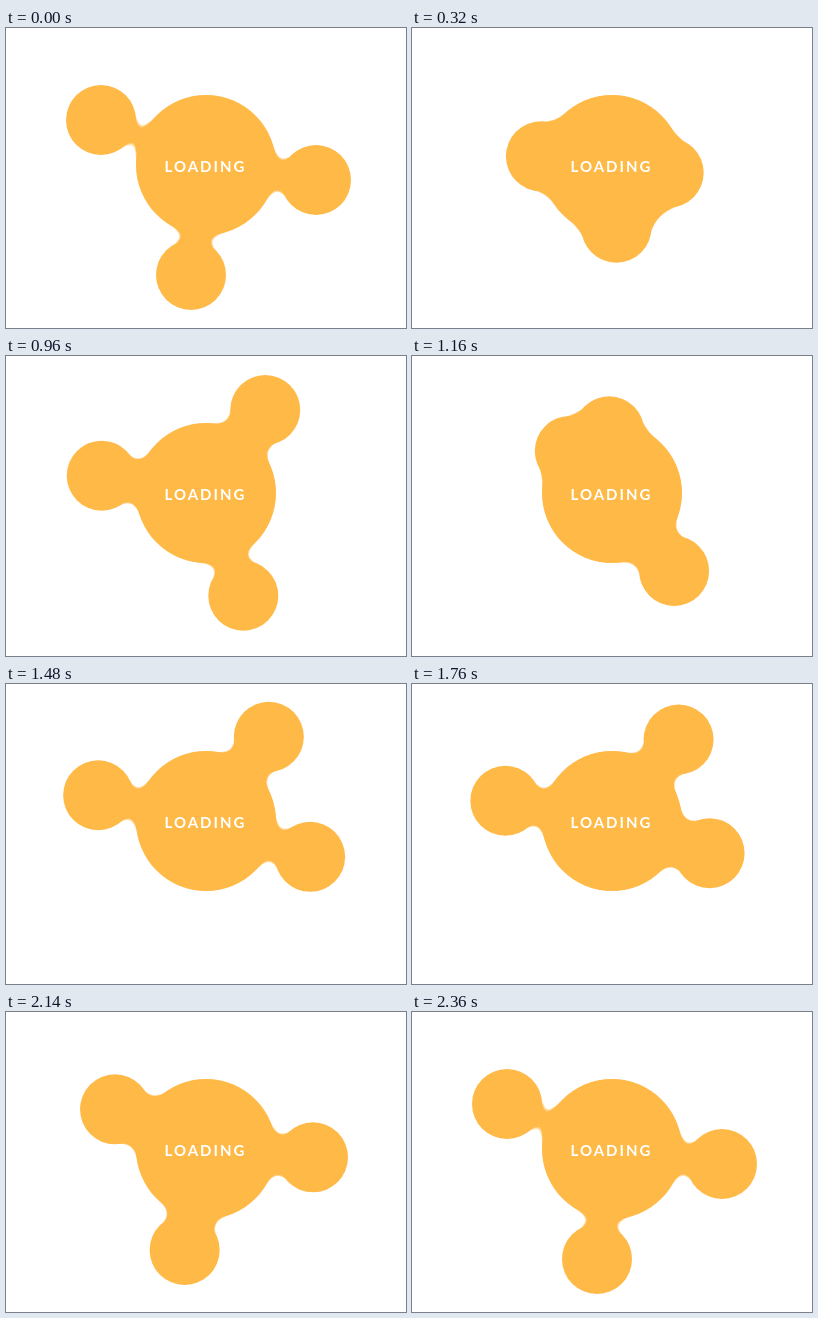
Animation of 400 by 300 pixels, one loop 2380 ms. Source, as an HTML page:

```html
<!DOCTYPE html>
<html lang="en">
<head>
<meta charset="utf-8">
<title>Gooey loader</title>
<style>
  html, body { margin: 0; width: 100%; height: 100%; overflow: hidden; background: #fff; }
  svg { display: block; width: 400px; height: 300px; }
  text { font: bold 15px Lato, "Open Sans", sans-serif; letter-spacing: 2px; fill: #fff; }
</style>
</head>
<body>
<svg viewBox="0 0 400 300">
  <defs>
    <filter id="goo" filterUnits="userSpaceOnUse" x="0" y="0" width="400" height="300"
            color-interpolation-filters="sRGB">
      <feGaussianBlur in="SourceGraphic" stdDeviation="10" result="blur"/>
      <feColorMatrix in="blur" values="1 0 0 0 0  0 1 0 0 0  0 0 1 0 0  0 0 0 19 -9" result="goo"/>
      <feBlend in="SourceGraphic" in2="goo"/>
    </filter>
  </defs>
  <g filter="url(#goo)" fill="#ffb947">
    <circle cx="200" cy="137" r="70"/>
    <circle class="ball" r="35"/>
    <circle class="ball" r="35"/>
    <circle class="ball" r="35"/>
  </g>
  <text x="158.5" y="144">LOADING</text>
</svg>
<script>
  const LOOP = 2380;
  const KEY_TIMES = [-12, 795, 1596, 2368];

  // Each ball visits three stops and returns to the first.
  const ROUTES = [
    [[95, 92], [235, 242], [305, 172]],
    [[310, 152], [90, 122], [265, 52]],
    [[185, 247], [265, 52], [90, 112]]
  ];
  const balls = document.querySelectorAll(".ball");

  const bezier = (s, a, b) => 3 * (1 - s) ** 2 * s * a + 3 * (1 - s) * s * s * b + s ** 3;

  // Same curve as cubic-bezier(.77, 0, .175, 1).
  function ease(x) {
    if (x <= 0 || x >= 1) return x <= 0 ? 0 : 1;
    let low = 0, high = 1;
    for (let i = 0; i < 24; i++) {
      const mid = (low + high) / 2;
      if (bezier(mid, 0.77, 0.175) < x) low = mid; else high = mid;
    }
    return bezier(low, 0, 1);
  }

  function draw(now) {
    const time = now % LOOP;
    const leg = time < KEY_TIMES[1] ? 0 : time < KEY_TIMES[2] ? 1 : 2;
    const start = KEY_TIMES[leg];
    const k = ease((time - start) / (KEY_TIMES[leg + 1] - start));
    ROUTES.forEach((stops, i) => {
      const from = stops[leg], to = stops[(leg + 1) % 3];
      balls[i].setAttribute("cx", from[0] + (to[0] - from[0]) * k);
      balls[i].setAttribute("cy", from[1] + (to[1] - from[1]) * k);
    });
  }

  let origin;
  function frame(now) {
    origin ??= now;
    draw(now - origin);
    requestAnimationFrame(frame);
  }
  draw(0);
  requestAnimationFrame(frame);
</script>
</body>
</html>
```
